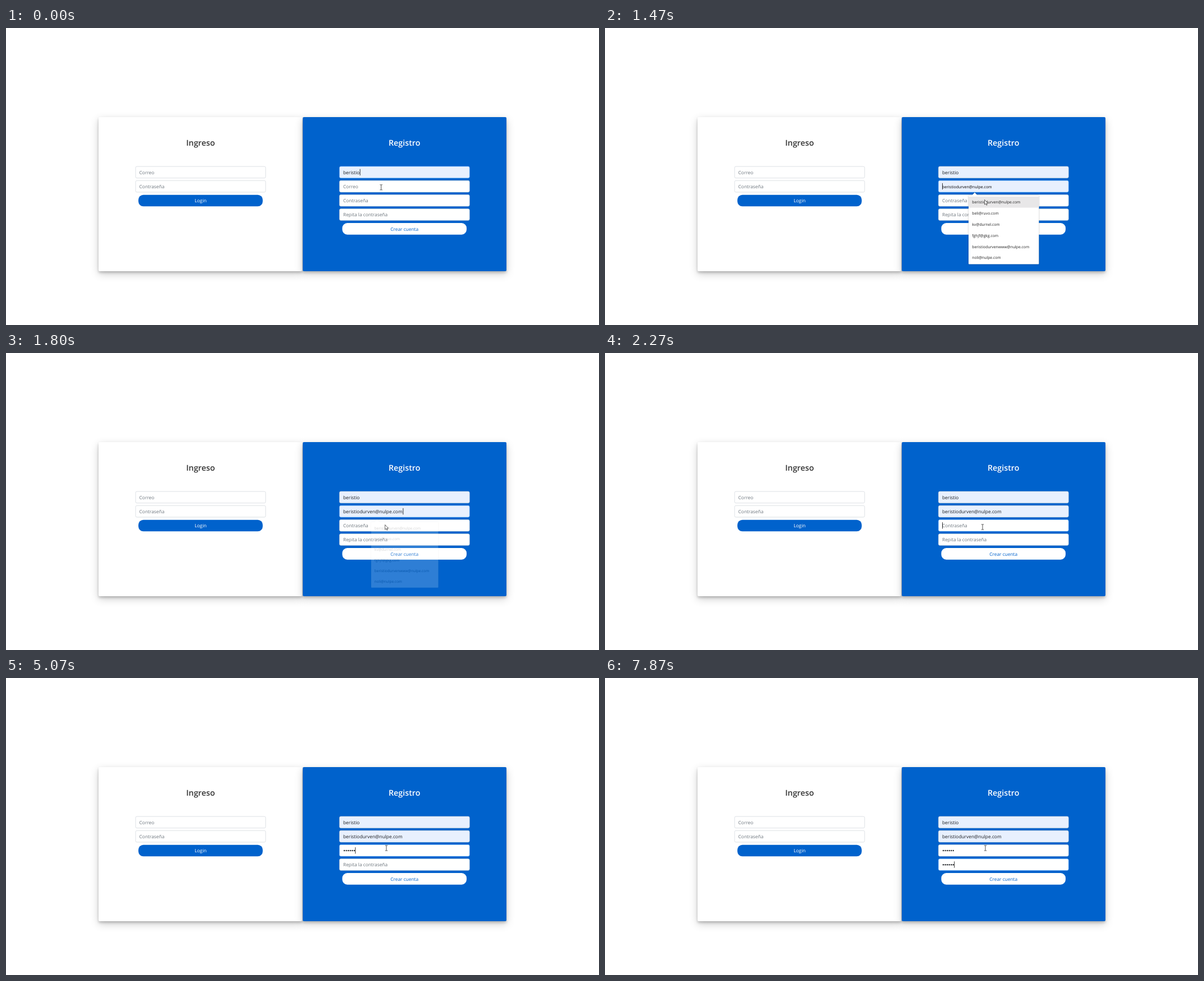
These frames come from a looping animation (1057 px wide and 530 px high, 8 s). An HTML page:

```html
<!DOCTYPE html>
<html lang="es">
<head>
<meta charset="utf-8">
<title>Ingreso y registro</title>
<style>
  html, body { margin: 0; width: 100%; height: 100%; overflow: hidden; background: #fff; }
  .card {
    position: absolute; top: 158.5px; width: 363.4px; height: 275px; border-radius: 2px;
    box-shadow: 0 2.8px 4.4px rgba(0,0,0,.2), 0 5px 14.4px rgba(0,0,0,.19);
  }
  #login { left: 165.1px; background: #fff; }
  #register { left: 528.5px; background: #0062cc; }
  svg { position: absolute; left: 0; top: 0; }
  text { font: 8.35px "Open Sans", "Noto Sans", sans-serif; text-rendering: geometricPrecision; }
  .title { font-size: 14.3px; font-weight: 600; text-anchor: middle; }
  .button { text-anchor: middle; }
  .hint { fill: #6c757d; }
  .value { fill: #1b1e21; }
  #popup text { font-size: 6.8px; fill: #222; }
  #popup .panel { filter: drop-shadow(0 .6px 1px rgba(0,0,0,.3)); fill: #fff; }
</style>
</head>
<body>
<div class="card" id="login"></div>
<div class="card" id="register"></div>
<svg id="stage" width="1057" height="530" viewBox="0 0 1057 530"></svg>
<script>
const LOOP = 8000;
const FRAME_RATE = 15 / 1000;
const BLINK = 530;
const BLUE = '#0062cc';
const USER = 'beristio';
const EMAILS = ['beristiodurven@nulpe.com', 'beli@ruvo.com', 'kv@durnel.com',
  'fghjf@gkg.com', 'beristiodurvenwww@nulpe.com', 'noli@nulpe.com'];
const KEYS_FIRST = [3400, 3800, 4070, 4470, 4730, 5070];
const KEYS_REPEAT = [6400, 6670, 6930, 7330, 7600, 7870];
const DOT_PITCH = 3.55;

// Pointer stops: time, x, y
const PATH = [
  [0, 668.7, 284.3], [133, 667.5, 287.5], [400, 667.5, 287.5], [466, 665.7, 287.5],
  [600, 666, 288], [1133, 676.6, 306.5], [1600, 676.6, 306.5], [1667, 675.6, 306.5],
  [2133, 675.6, 306.5], [2200, 673, 310.5], [2333, 673, 310.5], [2667, 677.6, 304.5],
  [3066, 677.6, 304.5], [3133, 678, 303.5]
];

const stage = document.getElementById('stage');

function add(tag, attrs, parent = stage) {
  const node = document.createElementNS('http://www.w3.org/2000/svg', tag);
  set(node, attrs);
  parent.append(node);
  return node;
}

function set(node, attrs) {
  for (const key in attrs) node.setAttribute(key, attrs[key]);
}

function label(content, x, y, attrs, parent) {
  const node = add('text', { x, y, ...attrs }, parent);
  node.textContent = content;
  return node;
}

const show = (node, visible) => node.setAttribute('visibility', visible ? 'inherit' : 'hidden');
const clamp = v => Math.max(0, Math.min(1, v));
const rowCenter = row => 257.4 + 25.2 * row;

function field(x, row, hint) {
  const cy = rowCenter(row);
  const box = add('rect', { x: x + .3, y: cy - 10.3, width: 231.8, height: 20.6, rx: 2.4,
    fill: '#fff', stroke: '#ced4da', 'stroke-width': .7 });
  const placeholder = label(hint, x + 6.9, cy + 3.1, { class: 'hint' });
  const value = label('', x + 6.9, cy + 3.1, { class: 'value' });
  const dots = Array.from({ length: 6 }, (_, i) =>
    add('circle', { cx: x + 8.9 + DOT_PITCH * i, cy: cy + .2, r: 1.2, fill: '#212529' }));
  show(value, false);
  dots.forEach(dot => show(dot, false));
  return { box, placeholder, value, dots };
}

function button(content, x, row, fill, color) {
  const cy = rowCenter(row) + .2;
  add('rect', { x, y: cy - 10.3, width: 221.6, height: 20.6, rx: 8.9, fill });
  label(content, x + 110.8, cy + 3.1, { class: 'button', fill: color });
}

label('Ingreso', 346.8, 210.2, { class: 'title', fill: '#333' });
label('Registro', 710.2, 210.2, { class: 'title', fill: '#fff' });
field(230.7, 0, 'Correo');
field(230.7, 1, 'Contraseña');
button('Login', 236, 2, BLUE, '#fff');
const fields = ['Nombre', 'Correo', 'Contraseña', 'Repita la contraseña']
  .map((hint, row) => field(594.1, row, hint));
button('Crear cuenta', 599.4, 4, '#fff', BLUE);

const [nameField, mailField] = fields;
nameField.value.textContent = USER;
mailField.value.textContent = EMAILS[0];
nameField.box.setAttribute('fill', '#e8f0fe');
show(nameField.placeholder, false);
show(nameField.value, true);

const caret = add('rect', { width: .8, height: 11.4, fill: '#000' });

const popup = add('g', { id: 'popup' });
add('path', { class: 'panel',
  d: 'M649 298.8H654L659 293.6 664 298.8H772.4Q773.4 298.8 773.4 299.8V420.5Q773.4 421.5 772.4 421.5H649Q648 421.5 648 420.5V299.8Q648 298.8 649 298.8Z' }, popup);
const highlight = add('rect', { x: 648, y: 300.8, width: 125.4, height: 19.8, fill: '#e8e7e8' }, popup);
EMAILS.forEach((mail, i) => label(mail, 654.3, 313.1 + 19.85 * i, {}, popup));

const arrow = add('path', { d: 'M0 0V8.6L2 6.8 3.3 9.7 4.6 9.1 3.4 6.3H6Z',
  fill: '#fff', stroke: '#000', 'stroke-width': .6 });
const beam = add('path', { d: 'M-2.2 -4.6H-.6L0 -4.2 .6 -4.6H2.2M0 -4.2V4.2M-2.2 4.6H-.6L0 4.2 .6 4.6H2.2',
  fill: 'none', stroke: '#222', 'stroke-width': .8 });

function pointerAt(t) {
  const next = PATH.findIndex(stop => stop[0] > t);
  if (next < 0) return PATH[PATH.length - 1].slice(1);
  const [t0, x0, y0] = PATH[next - 1];
  const [t1, x1, y1] = PATH[next];
  const k = (t - t0) / (t1 - t0);
  return [x0 + (x1 - x0) * k, y0 + (y1 - y0) * k];
}

// Border colour eases over 150 ms when focus enters or leaves
function drawBorders(t) {
  const focusTimes = [-1000, 400, 2135, 6000, 99999];
  fields.forEach(({ box }, i) => {
    const k = clamp((t - focusTimes[i] + 67) / 150) - clamp((t - focusTimes[i + 1] + 67) / 150);
    const mix = (a, b) => Math.round(a + (b - a) * k);
    box.setAttribute('stroke', `rgb(${mix(206, 128)},${mix(212, 189)},${mix(218, 255)})`);
  });
}

function drawPassword({ placeholder, dots }, count) {
  show(placeholder, count === 0);
  dots.forEach((dot, i) => show(dot, i < count));
}

function drawCaret(t, typed, repeated) {
  let row = 0, x = 630.7, since = t;
  if (t >= 6000) {
    [row, x, since] = [3, 601.1 + DOT_PITCH * repeated, repeated ? KEYS_REPEAT[repeated - 1] : 6000];
  } else if (t >= 2200) {
    [row, x, since] = [2, 601.1 + DOT_PITCH * typed, typed ? KEYS_FIRST[typed - 1] : 2138];
  } else if (t >= 1670) {
    [row, x, since] = [1, 707.5, 1670];
  } else if (t >= 400) {
    [row, x, since] = [1, 601.1, 405];
  }
  set(caret, { x, y: rowCenter(row) - 5.7 });
  show(caret, Math.floor((t - since) / BLINK) % 2 === 0);
}

function draw(t) {
  const tick = Math.floor(t * FRAME_RATE + .07) / FRAME_RATE;
  const [x, y] = pointerAt(tick);
  const overMenu = t >= 600 && t < 1930 && y > 293;
  const preview = overMenu && y > 300.8 && t < 1670;
  const filled = t >= 1670;

  drawBorders(tick);
  mailField.box.setAttribute('fill', preview || filled ? '#e8f0fe' : '#fff');
  show(mailField.placeholder, !preview && !filled);
  show(mailField.value, preview || filled);
  mailField.value.style.cssText = filled ? '' : 'font-size:7px;fill:#000';

  const typed = KEYS_FIRST.filter(key => t >= key).length;
  const repeated = KEYS_REPEAT.filter(key => t >= key).length;
  drawPassword(fields[2], typed);
  drawPassword(fields[3], repeated);
  drawCaret(t, typed, repeated);

  const opacity = t < 1670 ? clamp((tick - 333) / 133) : clamp(1 - (tick - 1640) / 195);
  const scale = .945 + .055 * opacity;
  set(popup, { opacity, transform: `translate(710.7 361) scale(${scale}) translate(-710.7 -361)` });
  show(popup, opacity > 0);
  show(highlight, preview);

  const place = `translate(${x} ${y})`;
  set(arrow, { transform: place });
  set(beam, { transform: place });
  show(arrow, overMenu);
  show(beam, !overMenu);
}

const start = performance.now();
function loop() {
  draw((performance.now() - start) % LOOP);
  requestAnimationFrame(loop);
}
loop();
</script>
</body>
</html>
```
